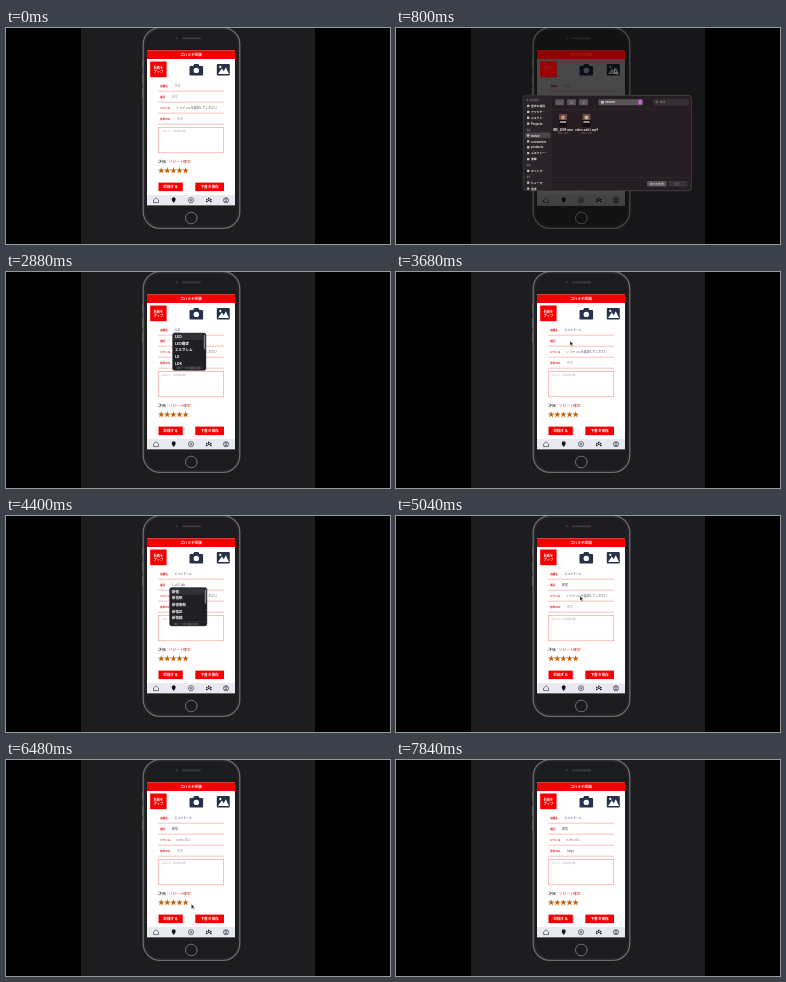
These frames come from a looping animation (384x216 px, 8000 ms). An HTML page:

```html
<!DOCTYPE html>
<html lang="ja">
<head>
<meta charset="utf-8">
<title>投稿フォーム</title>
<style>
html, body { margin: 0; width: 100%; height: 100%; overflow: hidden; background: #000; }
svg { display: block; width: 100vw; height: 100vh; }
text { font-family: "Noto Sans CJK JP", "Noto Sans CJK", "Noto Sans", sans-serif; white-space: pre; }
</style>
</head>
<body>
<svg id="stage" viewBox="0 0 384 216"></svg>
<script>
const LOOP = 8000, STEP = 80;
const RED = '#f40000', INK = '#26324a', LINE = '#ee9a94';
const stage = document.getElementById('stage');

function el(parent, tag, attrs = {}) {
  const node = document.createElementNS('http://www.w3.org/2000/svg', tag);
  for (const key in attrs) node.setAttribute(key, attrs[key]);
  parent.append(node);
  return node;
}
const group = (parent, attrs) => el(parent, 'g', attrs);
const rect = (p, x, y, width, height, fill, more) => el(p, 'rect', { x, y, width, height, fill, ...more });
const circle = (p, cx, cy, r, fill, more) => el(p, 'circle', { cx, cy, r, fill, ...more });
const path = (p, d, fill, more) => el(p, 'path', { d, fill, ...more });
function label(p, str, x, y, size, fill, more) {
  const node = el(p, 'text', { x, y, 'font-size': size, fill, ...more });
  node.textContent = str;
  return node;
}
const BOLD = { 'font-weight': 700 };
const MIDDLE = { 'text-anchor': 'middle' };
const HEAVY = { 'font-weight': 900, ...MIDDLE };
const show = (node, on) => node.setAttribute('visibility', on ? 'visible' : 'hidden');

// Phone
rect(stage, 0, 0, 384, 216, '#000');
rect(stage, 75, 0, 234, 216, '#1d1d1f');
for (const [y, h] of [[32, 7], [46, 10], [60, 10]]) rect(stage, 136, y, 1, h, '#555');
rect(stage, 137.2, -.4, 96.6, 200.8, '#1c1c1e', { rx: 17, stroke: '#6c6c6f', 'stroke-width': 1.3 });
rect(stage, 138.8, 1.1, 93.4, 197.8, 'none', { rx: 15.4, stroke: '#303033', 'stroke-width': .7 });
rect(stage, 176, 9.4, 19, 1.8, '#3c3c40', { rx: .9 });
circle(stage, 171, 10.3, 1.2, '#333438');
circle(stage, 185.3, 190, 5.8, '#1b1b1d', { stroke: '#7c7c80', 'stroke-width': .9 });

// Form
const form = group(stage);
rect(form, 141, 22.3, 88, 154.9, '#fff');
rect(form, 141, 22.3, 88, 8.7, RED);
label(form, 'ゴハミチ投稿', 185, 28.1, 3.6, '#fff', HEAVY);
rect(form, 144.2, 33.5, 16.4, 15.7, RED);
label(form, '動画を', 152.4, 40.5, 3.1, '#fff', HEAVY);
label(form, 'アップ', 152.4, 44.8, 3.1, '#fff', HEAVY);

path(form, 'M184.5 38H187l1.3-2h4l1.3 2h2.5q1 0 1 1v7.5q0 1-1 1h-11.6q-1 0-1-1V39q0-1 1-1z', INK);
circle(form, 190.3, 42.4, 2.7, '#fff');
rect(form, 210.8, 36, 13, 11.6, INK, { rx: 1 });
path(form, 'M212 46l3.8-5.4 2 2.6 2-4 3.2 6.8z', '#fff');
circle(form, 214.3, 38.9, 1.1, '#fff');

const fields = [['店舗名', 168.5], ['場所', 166], ['ジャンル', 170], ['参考URL', 171]].map(([name, x], i) => {
  const y = 59.2 + i * 11;
  label(form, name, 154, y, 2.6, '#e01818', BOLD);
  rect(form, 152, y + 3.6, 66, .6, LINE);
  return label(form, '', x, y, 2.9, '#888');
});
rect(form, 152.3, 99.4, 65.4, 25.4, '#fff', { stroke: LINE, 'stroke-width': .6 });
label(form, 'コメント（200字以内）', 155, 104.2, 2.5, '#999');
label(form, '評価：', 152.3, 134.8, 3.8, '#333');
label(form, 'リピート確定', 163, 134.8, 3.6, '#c2361c', { 'font-weight': 500 });

function star(cx, cy, r) {
  const points = Array.from({ length: 10 }, (_, i) => {
    const a = i * Math.PI / 5 - Math.PI / 2, d = i % 2 ? r * .42 : r;
    return (cx + d * Math.cos(a)).toFixed(2) + ',' + (cy + d * Math.sin(a)).toFixed(2);
  });
  el(form, 'polygon', { points: points.join(' '), fill: '#c8640c' });
}
for (let i = 0; i < 5; i++) star(155.2 + i * 6.1, 142.6, 3.3);

rect(form, 152.5, 154.6, 24.3, 8.5, RED);
label(form, '投稿する', 164.6, 160.2, 3.7, '#fff', HEAVY);
rect(form, 189.3, 154.6, 28.7, 8.5, RED);
label(form, '下書き保存', 203.6, 160.2, 3.7, '#fff', HEAVY);

rect(form, 141, 167, 88, 10.2, '#e8eaef');
const outline = { stroke: '#222b3a', 'stroke-width': .6 };
path(form, 'M147.6 172l2.5-2.3 2.5 2.3v2.6h-5z', 'none', outline);
path(form, 'M167.7 175q-2.2-2.6-2-3.8a2 2 0 0 1 4 0q.2 1.2-2 3.8z', '#111827');
circle(form, 185, 172.2, 2.6, 'none', outline);
path(form, 'M185 170.9v2.6M183.7 172.2h2.6', 'none', outline);
for (const [x, y] of [[200.8, 171.6], [202.8, 170.4], [204.8, 171.6]]) {
  circle(form, x, y, .8, '#111827');
  rect(form, x - .9, y + 1.2, 1.8, 1.5, '#111827', { rx: .7 });
}
circle(form, 220, 172.2, 2.6, 'none', outline);
circle(form, 220, 171.4, 1, 'none', outline);
path(form, 'M218.2 174q1.8-1.6 3.6 0', 'none', outline);

// File dialog over the darkened page
const dialog = group(stage);
rect(dialog, 75, 0, 234, 216, '#000', { opacity: .2 });
rect(dialog, 136.5, 0, 98, 201, '#000', { opacity: .2, rx: 17 });
rect(dialog, 141, 22.3, 88, 154.9, '#000', { opacity: .56 });
rect(dialog, 141, 22.3, 88, 8.7, RED, { opacity: .45 });
rect(dialog, 144.2, 33.5, 16.4, 15.7, RED, { opacity: .5 });
rect(dialog, 127.3, 67.3, 168, 95.4, '#251d21', { rx: 2.5, stroke: '#5a5257', 'stroke-width': .6 });
path(dialog, 'M129.6 67.6H156v94.8h-26.4q-2 0-2-2V69.6q0-2 2-2z', '#2a2327');
rect(dialog, 156, 81.5, 139, .4, '#3a3237');
rect(dialog, 156, 149.5, 139, .4, '#3a3237');
rect(dialog, 129, 104.4, 25.5, 5.6, '#4c454a', { rx: 1 });
const places = ['よく使う項目', '最近の項目', 'アプリケ…', 'デスクト…', 'Projects…', '場所', 'movie',
  'screenshot', 'products', 'デスクトー…', '書類', '場所', 'ネットワ…', 'タグ', 'ヒューマ…', '音楽'];
places.forEach((name, i) => {
  const y = 73.2 + i * 5.9, heading = [0, 5, 11, 13].includes(i);
  if (!heading) rect(dialog, 131, y - 2.3, 2.4, 2.3, '#c4b8c0', { rx: .5 });
  label(dialog, name, heading ? 130.5 : 135, y, heading ? 2 : 2.8, heading ? '#8d858b' : '#f0ecee', BOLD);
});
const control = (x, w) => rect(dialog, x, 71.2, w, 6, '#5b5459', { rx: 1.2 });
['‹ ›', '☷', '⠿'].forEach((icon, i) => {
  const x = 159 + i * 12;
  control(x, 9);
  label(dialog, icon, x + 4.5, 75.6, 3.5, '#ccc', MIDDLE);
});
control(202.5, 44.5);
rect(dialog, 205, 72.9, 3, 2.6, '#c4b8c0', { rx: .5 });
label(dialog, 'movie', 209.5, 75.4, 3, '#eee', BOLD);
rect(dialog, 242, 71.6, 4.4, 5.2, '#b04fb8', { rx: 1 });
path(dialog, 'M243.1 73.7l1.1-1 1.1 1M243.1 74.8l1.1 1 1.1-1', 'none', { stroke: '#fff', 'stroke-width': .4 });
rect(dialog, 257.5, 71.2, 35, 6, '#352e32', { rx: 1.2, stroke: '#4c454a', 'stroke-width': .3 });
circle(dialog, 260.8, 74, 1, 'none', { stroke: '#aaa', 'stroke-width': .4 });
label(dialog, '検索', 264, 75.2, 2.7, '#989096');
[['IMG_2004.mov', 167], ['video-edit1.mp4', 190.5]].forEach(([name, x], i) => {
  rect(dialog, x - 4, 86, 8, 12.8, '#120c0d');
  rect(dialog, x - 4, 86, 8, 6, i ? '#66503e' : '#70443a');
  circle(dialog, x, 89.5, 2, i ? '#c9b39b' : '#c99a84');
  rect(dialog, x - 3.2, 93.4, 6.4, 1.2, '#e9e4dc');
  label(dialog, name, x, 103.3, 2.8, '#f4f0f2', { ...BOLD, ...MIDDLE });
  label(dialog, '1920×1080', x, 106.2, 2, '#8f868c', MIDDLE);
});
rect(dialog, 251, 153, 19.5, 5.4, '#5b5459', { rx: 1.2 });
label(dialog, '表示の変更', 260.7, 156.7, 2.8, '#eee', MIDDLE);
rect(dialog, 272.5, 153, 19, 5.4, '#3a3337', { rx: 1.2 });
label(dialog, '開く', 282, 156.7, 2.8, '#7d757b', MIDDLE);

// Input suggestions
function suggestions(x, y, width, height, words) {
  const box = group(stage);
  rect(box, x, y, width, height, '#202024', { rx: 2, stroke: '#55555a', 'stroke-width': .5 });
  rect(box, x + .4, y + 1, width - 3.5, 6, '#303036', { rx: 1 });
  words.forEach((word, i) => label(box, word, x + 2.5, y + 5.2 + i * 6.6, 3.5, '#fff', BOLD));
  rect(box, x + width - 2.2, y + 2, 1.3, 14, '#8b8b90', { rx: .6 });
  rect(box, x + 1, y + height - 4.6, width - 2, .3, '#4b4b50');
  label(box, '（tabキーで次の候補を選択）', x + 2.5, y + height - 1.5, 2.1, '#9a9aa0');
  return box;
}
const shopHints = suggestions(166.5, 61, 33.5, 37.5, ['LED', 'LED電球', 'エルサレム', 'LD', 'LDK']);
const placeHints = suggestions(163.5, 71.5, 37.5, 38.5, ['新宿', '新宿駅', '新宿御苑', '新宿区', '新宿線']);

// Genre menu, translucent over the page and dark below it
const PITCH = 4.87, MENU_TOP = 80.9;
const genres = ['∨ ジャンルを選択してください', '麺類', '寿司', '和食', 'イタリアン', '居酒屋', '中華', 'ラーメン',
  '洋食', '韓国料理', 'フレンチ', 'エスニック', 'カレー', 'ハンバーガー', '海鮮丼', 'メキシカン', 'スペイン',
  'ステーキ', 'アジアン', 'ビーガン', '鍋料理', '鍋', 'おでん', '牛丼', '餃子', '天ぷら', 'お好み焼', 'タイ', 'うどん'];
const menu = group(stage);
const shade = el(menu, 'linearGradient', { id: 'shade', x1: 0, x2: 0, y1: 0, y2: 1 });
for (const [offset, color] of [[0, '#655f5e'], [.62, '#5c5556'], [.8, '#2e282b'], [1, '#2a2427']])
  el(shade, 'stop', { offset, 'stop-color': color });
rect(menu, 167, 76, 46, 145, 'url(#shade)', { rx: 2, stroke: '#6a6466', 'stroke-width': .4 });
const highlight = rect(menu, 167.3, 0, 45.4, PITCH, '#bf43cb', { rx: .8 });
label(menu, '✓', 168.8, MENU_TOP, 2.7, '#fff');
genres.forEach((name, i) => label(menu, name, 172, MENU_TOP + i * PITCH, 2.75, '#f8f6f8', BOLD));

const cursor = path(stage, 'M0 0v4.6l1.1-1 .8 1.8.8-.4-.8-1.7h1.5z', '#111', { stroke: '#eee', 'stroke-width': .4 });

// Timeline: [time, value]
const typed = [
  [[0, '任意'], [2080, ''], [2400, 'e'], [2480, 'え'], [2640, 'える'], [3040, 'えるm'], [3120, 'えるみな'],
    [3280, 'えるみなーる'], [3440, 'エルミナール']],
  [[0, '任意'], [3680, ''], [3840, 's'], [3920, 'し'], [4000, 'しn'], [4080, 'しんj'], [4240, 'しんじゅ'],
    [4400, 'しんじゅk'], [4560, 'しんじゅく'], [4720, '新宿']],
  [[0, '∨ ジャンルを選択してください'], [6400, 'メキシカン']],
  [[0, '任意'], [6800, ''], [7040, 'h'], [7120, 'ht'], [7280, 'htt'], [7440, 'http'], [7600, 'https']]
];
const hovered = [[0, 0], [5200, 3], [5280, 6], [5360, 10], [5440, 13], [5520, 15], [5600, 16], [5760, 18],
  [5920, 17], [6080, 15]];
const trips = [
  [[80, 228, 80], [320, 218.5, 41], [960, 218.5, 41]],
  [[960, 218.5, 41], [1280, 282, 156], [1600, 229, 126], [2000, 176, 58], [2320, 176, 58]],
  [[3520, 180, 64], [3680, 174, 69], [3760, 174, 69]],
  [[4800, 180, 72], [5040, 184, 80], [5280, 186, 108], [5600, 186, 158], [5760, 186, 167], [6080, 186, 154],
    [6400, 186, 154], [6720, 182, 91], [6960, 182, 91]]
];
const at = (table, t) => table.findLast(row => row[0] <= t)[1];
const within = (t, from, to) => t >= from && t < to;

function moveCursor(t) {
  const trip = trips.find(k => within(t, k[0][0], k[k.length - 1][0]));
  show(cursor, trip);
  if (!trip) return;
  const i = trip.findIndex(k => k[0] > t);
  const [t0, x0, y0] = trip[i - 1], [t1, x1, y1] = trip[i];
  const u = (t - t0) / (t1 - t0), e = u * u * (3 - 2 * u);
  cursor.setAttribute('transform', `translate(${x0 + (x1 - x0) * e} ${y0 + (y1 - y0) * e})`);
}

function render(t) {
  fields.forEach((field, i) => {
    const value = at(typed[i], t), initial = value === typed[i][0][1];
    field.textContent = value;
    field.setAttribute('fill', initial && i !== 2 ? '#999' : '#3c4050');
    field.setAttribute('text-decoration', /[ぁ-ん]/.test(value) && i < 2 ? 'underline' : 'none');
  });
  show(dialog, within(t, 480, 1360));
  show(shopHints, within(t, 2560, 3440));
  show(placeHints, within(t, 4000, 4720));
  show(menu, within(t, 5120, 6400));
  highlight.setAttribute('y', MENU_TOP - 3.5 + at(hovered, t) * PITCH);
  moveCursor(t);
}

function tick() {
  render(Math.floor(performance.now() % LOOP / STEP) * STEP);
  requestAnimationFrame(tick);
}
tick();
</script>
</body>
</html>
```
